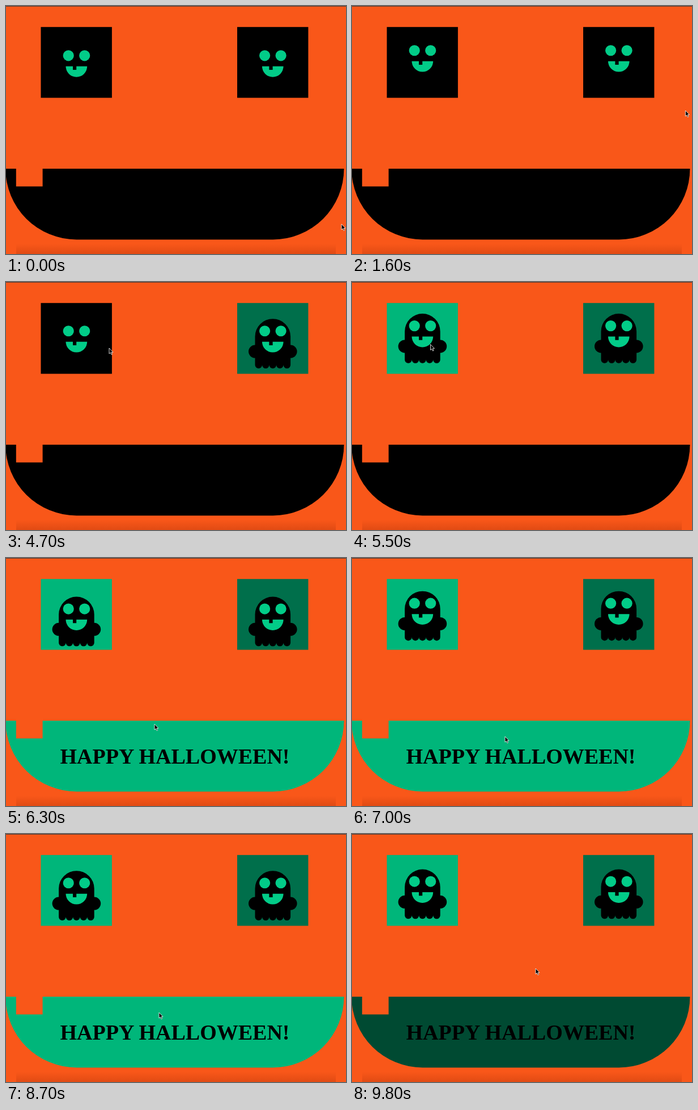
An HTML page that plays this animation: 600 px wide and 439 px high, repeating every 9.9 s.

```html
<!DOCTYPE html>
<html lang="en">
<head>
<meta charset="utf-8">
<title>Happy Halloween</title>
<style>
  html, body { margin: 0; width: 100%; height: 100%; overflow: hidden; background: #f95719; }
  svg { display: block; width: 600px; height: 439px; }
  text { font: bold 38px "Liberation Serif", "Times New Roman", serif; }
</style>
</head>
<body>
<svg viewBox="0 0 600 439">
  <defs>
    <linearGradient id="shade" x1="0" y1="0" x2="0" y2="1">
      <stop offset="0" stop-color="#8a2000" stop-opacity="0"/>
      <stop offset="1" stop-color="#8a2000" stop-opacity=".22"/>
    </linearGradient>
    <g id="ghost">
      <path d="M-31.3 60V9.8a31.3 31.3 0 0 1 62.6 0V60
        a6.26 6.26 0 0 1-12.52 0a6.26 6.26 0 0 1-12.52 0a6.26 6.26 0 0 1-12.52 0
        a6.26 6.26 0 0 1-12.52 0a6.26 6.26 0 0 1-12.52 0z"/>
      <circle cx="-31.3" cy="36.3" r="11.5"/>
      <circle cx="31.3" cy="36.3" r="11.5"/>
      <g fill="#02cc88">
        <circle cx="-14.2" r="9.6"/>
        <circle cx="14.3" r="9.6"/>
        <path d="M-18.9 19H-6.4V25.2H-.2V19H18.8A18.85 18.85 0 0 1-18.9 19z"/>
      </g>
    </g>
  </defs>
  <rect width="600" height="439" fill="#f95719"/>
  <rect x="18" y="421" width="564" height="18" fill="url(#shade)"/>
  <rect width="600" height="1" fill="#4a3a34"/>
  <rect id="left" x="61.5" y="37.2" width="125.4" height="125.3"/>
  <rect id="right" x="408" y="37.2" width="125.4" height="125.3"/>
  <use id="ghostL" href="#ghost"/>
  <use id="ghostR" href="#ghost"/>
  <path id="mouth" d="M-.8 288H596.4A125.4 125.4 0 0 1 471 413.4H124.6A125.4 125.4 0 0 1-.8 288z"/>
  <rect x="17.8" y="287" width="46.8" height="32.4" fill="#f95719"/>
  <text x="298" y="363.5" text-anchor="middle">HAPPY HALLOWEEN!</text>
  <path id="cursor" d="M0 0V10L2.3 8L4 11.6L5.6 10.9L4 7.3H7z"
    fill="#000" stroke="#fff" stroke-width=".8" stroke-linejoin="round"/>
</svg>
<script>
const LOOP = 9900;
const $ = id => document.getElementById(id);
const clamp = v => Math.min(1, Math.max(0, v));
const mix = (a, b, k) => a + (b - a) * k;
const smooth = k => k * k * (3 - 2 * k);
const ramp = (t, a, b) => clamp((t - a) / (b - a));

// cubic-bezier(.25, .1, .25, 1)
function ease(x) {
  let lo = 0, hi = 1;
  for (let i = 0; i < 22; i++) {
    const m = (lo + hi) / 2, n = 1 - m;
    if (.75 * n * m + m * m * m < x) lo = m; else hi = m;
  }
  const s = lo, n = 1 - s;
  return .3 * n * n * s + 3 * n * s * s + s * s * s;
}

// eye height: two eased halves, lowest at 505 ms of each 2 s cycle
function bob(t) {
  const c = ((t - 505 + 2000) % 2000) / 1000;
  return c < 1 ? mix(90.4, 77.6, ease(c)) : mix(77.6, 90.4, ease(c - 1));
}

// pointer stops: time, x, y
const stops = [
  [0, 592, 386], [200, 592, 386], [1000, 591, 211], [2000, 587, 171],
  [2400, 540, 156], [3100, 463, 133], [4100, 450, 128], [4700, 182, 117],
  [5100, 140, 106], [5700, 138, 112], [6300, 262, 294], [6700, 270, 316],
  [9100, 270, 316], [9700, 324, 238], [LOOP, 324, 238]
];

function pointer(t) {
  let i = 1;
  while (i < stops.length - 1 && stops[i][0] < t) i++;
  const [t0, x0, y0] = stops[i - 1], [t1, x1, y1] = stops[i];
  const k = smooth(ramp(t, t0, t1));
  return [mix(x0, x1, k), mix(y0, y1, k)];
}

const green = k => `rgb(0,${Math.round(182 * k)},${Math.round(122 * k)})`;

function draw(t) {
  const y = bob(t);
  $("ghostL").setAttribute("transform", `translate(124.4 ${y})`);
  $("ghostR").setAttribute("transform", `translate(470.8 ${y})`);
  $("right").setAttribute("fill", green(.612 * ramp(t, 2500, 3150)));
  $("left").setAttribute("fill", green(ramp(t, 4750, 5500)));
  $("mouth").setAttribute("fill", green(ramp(t, 6020, 6300) - .593 * ramp(t, 9300, 9800)));
  $("cursor").setAttribute("transform", `translate(${pointer(t)})`);
}

function tick() {
  draw(performance.now() % LOOP);
  requestAnimationFrame(tick);
}
tick();
</script>
</body>
</html>
```
